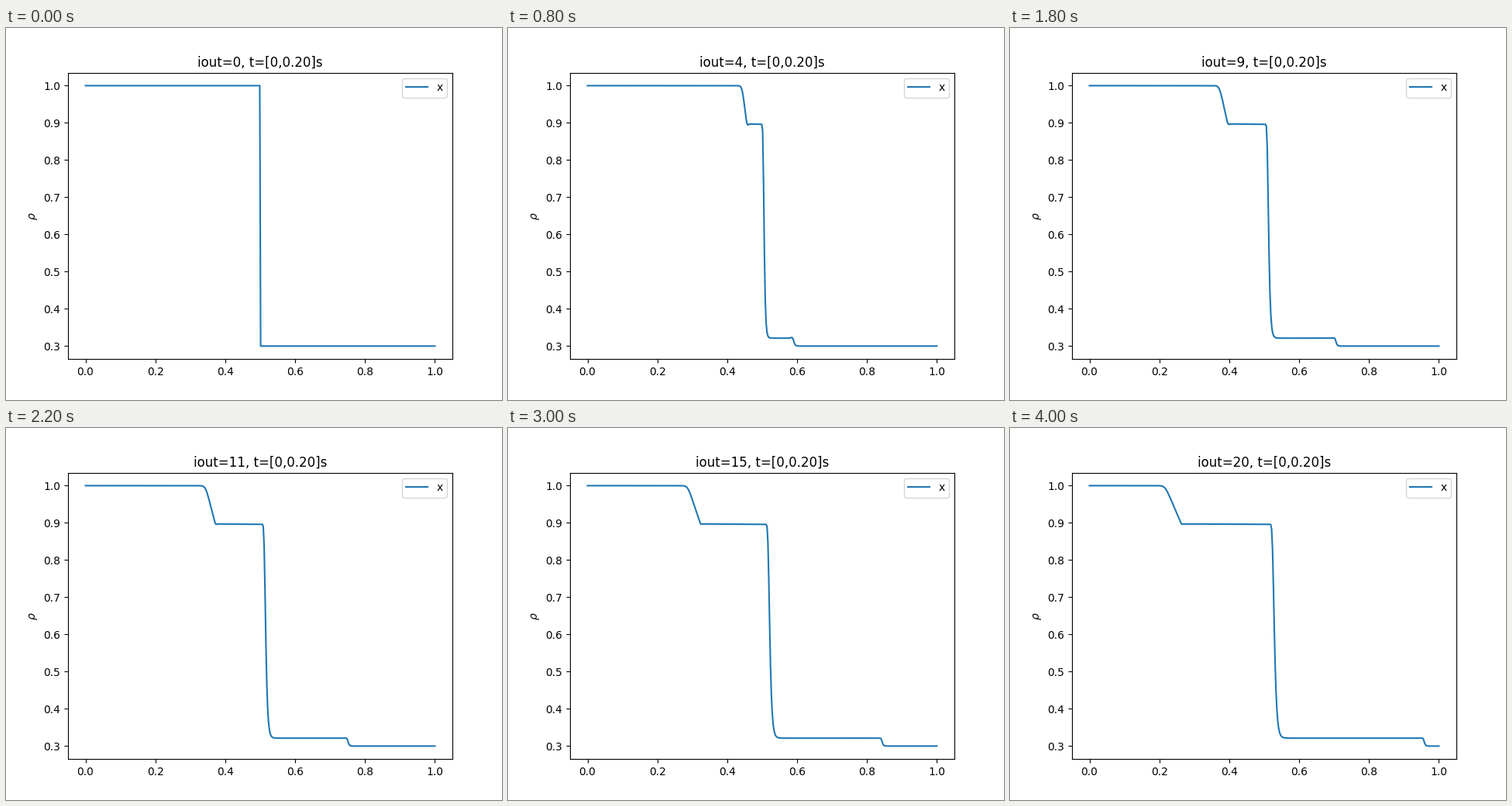
Animation of 640 by 480 pixels, one loop 4200 ms. Source, as a matplotlib script:

```python
import numpy as np
import matplotlib.pyplot as plt
from matplotlib.animation import FuncAnimation

FRAMES, INTERVAL = 21, 200
RHO_LEFT, RHO_RIGHT = 1.0, 0.3
RHO_FAN, RHO_SHOCK = 0.896, 0.3213

x = np.linspace(0, 1, 400)


def soft_ramp(d, eps):
    """Smooth max(d, 0)."""
    return eps * np.logaddexp(0, d / eps)


def front(mean, width):
    """Step from 0 to 1 with a sharp start and a long tail."""
    s = (x - mean) / width + 0.577
    return np.exp(-np.exp(np.clip(-s, -50, 50)))


def bump(center, width):
    return np.exp(-((x - center) / width) ** 2)


def density(n):
    if n == 0:
        return np.where(x < 0.5, RHO_LEFT, RHO_RIGHT)
    spread = (n / 20) ** 0.36
    head = 0.499 - 0.01414 * n
    foot = 0.5042 - 0.01204 * n
    contact = 0.5 + 0.0015 * n
    shock = 0.4997 + 0.02295 * n

    # rarefaction fan, then a plateau that falls slightly towards the contact
    fan = soft_ramp(x - head, 0.0043 * spread) - soft_ramp(x - foot, 0.0009)
    left = RHO_LEFT - (RHO_LEFT - RHO_FAN) * fan / (foot - head)
    slope = np.clip((contact - x) / (contact - foot), 0, 1)
    left += 0.0011 * slope * (x > foot)
    left -= min(0.004, 0.012 / n) * bump(foot + 0.002, 0.004)

    overshoot = 0.0018 * min(1.5, np.exp((4 - n) / 3))
    middle = RHO_SHOCK + overshoot * bump(shock - 0.0075, 0.004)
    right = middle + (RHO_RIGHT - middle) * front(shock, 0.0024)
    return left + (right - left) * front(contact, 0.0046 * spread)


fig, ax = plt.subplots(figsize=(6.4, 4.8), dpi=100)
line, = ax.plot(x, density(0), label="x")
ax.set_xlim(-0.05, 1.05)
ax.set_ylim(0.265, 1.035)
ax.set_ylabel(r"$\rho$")
ax.legend(loc="upper right")
title = ax.set_title("")


def update(n):
    line.set_ydata(density(n))
    title.set_text(f"iout={n}, t=[0,0.20]s")
    return line, title


anim = FuncAnimation(fig, update, frames=FRAMES, interval=INTERVAL,
                     repeat=True, repeat_delay=0)
plt.show()
```
